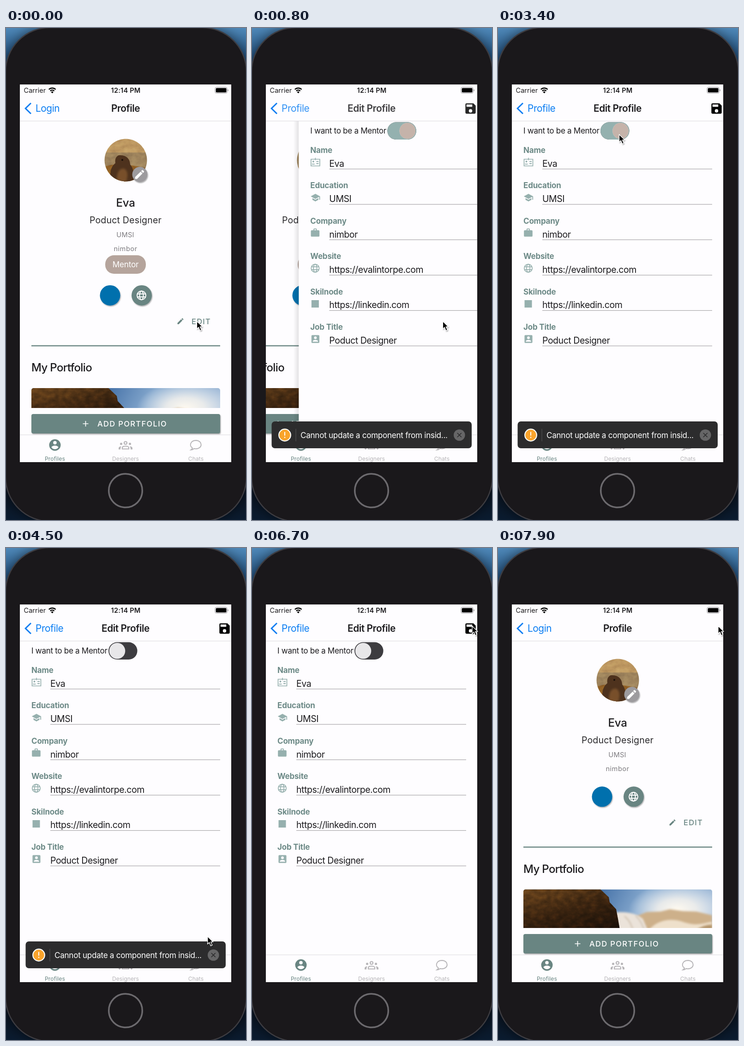
An HTML page for the animation above (8 s loop, 520 by 1063 pixels).

```html
<!DOCTYPE html>
<html lang="en">
<head>
<meta charset="utf-8">
<title>Edit profile</title>
<style>
html, body { margin: 0; width: 100%; height: 100%; overflow: hidden; background: #0b1626; }
svg { display: block; width: 100vw; height: 100vh; font-family: Inter, sans-serif; }
</style>
</head>
<body>
<svg id="stage" viewBox="0 0 520 1063" xmlns="http://www.w3.org/2000/svg"></svg>
<script>
const TEAL = '#698582', PALE = '#96b0ae', BLUE = '#0a7df2', INK = '#1c1b1e', PAPER = '#fefdff', GREY = '#b7b5b8';
const LOOP = 8000, STEP = 100, WIDTH = 458, LIFT = 40.4;

const ICON = {
  pencil: 'M20.7 7C21.1 6.6 21.1 6 20.7 5.6L18.4 3.3C18 2.9 17.3 2.9 17 3.3L15.1 5.1L18.9 8.9M3 17.2V21H6.8L17.8 9.9L14.1 6.2Z',
  person: 'M12 19.2C9.5 19.2 7.3 17.9 6 16C6 14 10 12.9 12 12.9S18 14 18 16C16.7 17.9 14.5 19.2 12 19.2M12 5A3 3 0 0 1 12 11A3 3 0 0 1 12 5M12 2A10 10 0 0 0 12 22A10 10 0 0 0 12 2Z',
  save: 'M15 9H5V5H15M12 19A3 3 0 0 1 12 13A3 3 0 0 1 12 19M17 3H5A2 2 0 0 0 3 5V19A2 2 0 0 0 5 21H19A2 2 0 0 0 21 19V7Z',
  school: 'M12 3L1 9L12 15L21 10.1V17H23V9M5 13.2V17.2L12 21L19 17.2V13.2L12 17Z',
  bag: 'M10 2H14A2 2 0 0 1 16 4V6H20A2 2 0 0 1 22 8V19A2 2 0 0 1 20 21H4A2 2 0 0 1 2 19V8A2 2 0 0 1 4 6H8V4A2 2 0 0 1 10 2M14 6V4H10V6Z',
  box: 'M6 17C6 15 10 13.9 12 13.9S18 15 18 17V18H6M12 6A3 3 0 0 1 12 12A3 3 0 0 1 12 6M3 5V19A2 2 0 0 0 5 21H19A2 2 0 0 0 21 19V5A2 2 0 0 0 19 3H5A2 2 0 0 0 3 5Z',
  square: 'M4 4H20V20H4Z'
};

const icon = (name, x, y, k, fill) =>
  `<path d="${ICON[name]}" fill="${fill}" fill-rule="evenodd" transform="translate(${x} ${y}) scale(${k}) translate(-12 -12)"/>`;
const text = (x, y, s, size, fill, ls = 0, weight = 400, anchor = 'start') =>
  `<text x="${x}" y="${y}" font-size="${size}" fill="${fill}" letter-spacing="${ls}" font-weight="${weight}" text-anchor="${anchor}">${s}</text>`;
const mid = (x, y, s, size, fill, ls, weight) => text(x, y, s, size, fill, ls, weight, 'middle');
const rect = (x, y, w, h, fill, rx = 0, more = '') =>
  `<rect x="${x}" y="${y}" width="${w}" height="${h}" fill="${fill}" rx="${rx}" ${more}/>`;
const disc = (x, y, r, fill, more = '') => `<circle cx="${x}" cy="${y}" r="${r}" fill="${fill}" ${more}/>`;
const shape = (d, fill, more = '') => `<path d="${d}" fill="${fill}" ${more}/>`;
const line = (d, stroke, w = 1, more = '') => `<path d="${d}" fill="none" stroke="${stroke}" stroke-width="${w}" ${more}/>`;
const group = (id, body, more = '') => `<g id="${id}" ${more}>${body}</g>`;
const SHADOW = 'filter="url(#drop)"', SOFT = 'filter="url(#soft)"', GRAIN = 'filter="url(#grain)"';

const globe = (x, y, r, c, w) => disc(x, y, r, 'none', `stroke="${c}" stroke-width="${w}"`) +
  `<ellipse cx="${x}" cy="${y}" rx="${r * .43}" ry="${r}" fill="none" stroke="${c}" stroke-width="${w}"/>` +
  line(`M${x - r * .93} ${y - r * .35}h${r * 1.86}m0 ${r * .7}h${-r * 1.86}`, c, w);

const photo = '<g clip-path="url(#photo)">' +
  rect(55, 778, 409, 110, 'url(#sky)') + rect(55, 778, 409, 110, 'url(#glow)') +
  shape('M300 836L322 827 352 826 372 821 400 825 430 826 464 834V888H290Z', '#cdb08a', SOFT) +
  shape('M315 888C330 845 370 838 400 848S440 852 464 848V888Z', '#eee0cb', SOFT) +
  shape('M410 888Q430 855 464 854V888Z', '#b3946c', SOFT) +
  shape('M246 829C275 824 300 829 314 842L334 888H262Z', '#ebe3da', SOFT) +
  line('M274 836c14 10 20 30 24 56m0-57c14 12 20 30 25 57', '#c9b9a5', 2, SOFT) +
  shape('M55 778H222L240 795 242 806 256 821 260 842 268 888H55Z', 'url(#rock)', GRAIN) + '</g>';

const avatar = '<g clip-path="url(#face)">' +
  `<g ${GRAIN}>` + rect(213, 239, 93, 93, '#9f8a6b') + rect(213, 239, 93, 30, '#bf9f70') +
  shape('M213 300Q240 288 306 303V332H213Z', '#93682f') + '</g>' +
  shape('M227 332C224 310 228 299 237 292C235 283 240 273 249 275C260 275 269 283 269 295C276 302 279 318 276 332Z', '#4e321d') +
  shape('M241 332C238 314 246 302 256 304C264 308 265 320 260 332Z', '#78502c', SOFT) +
  disc(252, 285, 2, '#1a100a') + '</g>' +
  disc(290, 316.5, 16.5, '#9d9b9e', SHADOW) + icon('pencil', 289.5, 316.5, 1.08, '#fff');

const profile = rect(30, 201, WIDTH, 678, PAPER) + avatar +
  mid(259, 386, 'Eva', 24, INK, -.2, 500) +
  mid(259, 422, 'Poduct Designer', 19.5, '#2a292c', .2) +
  mid(258.5, 452, 'UMSI', 14.6, '#7c7a7e', .3) +
  mid(259, 481.5, 'nimbor', 14.6, '#7c7a7e', .5) +
  group('pill', rect(215, 491, 88, 40, '#b5a49c', 19) + mid(259, 517, 'Mentor', 17.1, '#fff', -.2)) +
  '<g clip-path="url(#list)">' + group('lower',
    disc(225.5, 577.7, 22, '#0670ad', SHADOW) +
    disc(294, 577.7, 22, TEAL, SHADOW) + globe(293.5, 577.7, 9.5, '#fff', 2) +
    icon('pencil', 378, 633.5, .72, TEAL) + text(402, 639.5, 'EDIT', 16.5, TEAL, 1.2, 500) +
    rect(55, 685.4, 409, 2.4, TEAL) +
    text(55, 742, 'My Portfolio', 24, INK, -.65, 500) + photo) + '</g>' +
  rect(55, 834, 409, 42, TEAL, 4, SHADOW) +
  line('M166.500 855h12m-6-6v12', '#fff', 1.7) + text(198, 861, 'ADD PORTFOLIO', 16.5, '#fff', 1.35, 500);

const idCard = line('M56.500 283.500h19v14.500h-19zM66 280.500v5', PALE, 1.7) +
  disc(61.5, 288.5, 1.9, PALE) + line('M58.500 294.200h6m3.500-5.700h5m-5 4.500h5', PALE, 1.8);
const fields = [
  ['Name', 'Eva', idCard],
  ['Education', 'UMSI', icon('school', 66, 366.5, .92, PALE)],
  ['Company', 'nimbor', icon('bag', 65.5, 442.5, .93, PALE)],
  ['Website', 'https://evalintorpe.com', globe(65.5, 519, 8.7, PALE, 1.7)],
  ['Skilnode', 'https://linkedin.com', icon('square', 65.5, 596, 1, PALE)],
  ['Job Title', 'Poduct Designer', icon('box', 66, 672, .95, PALE)]
].map(([label, value, mark], i) => {
  const y = i * 76.45;
  return text(55, 270 + y, label, 17, '#6d8a87', -.2, 700) + mark +
    text(96, 299.6 + y, value, 19.5, INK, -.46) + rect(96, 304 + y, 368, 1.2, '#a9a7aa');
}).join('');

const edit = group('shade', rect(18, 201, 12, 678, 'url(#edge)')) + rect(30, 201, WIDTH, 678, PAPER) +
  text(55, 228, 'I want to be a Mentor', 17.1, INK, -.32) +
  rect(222, 203.5, 62.5, 37.5, '#3d3c40', 18.75) +
  group('on', rect(222, 203.5, 62.5, 37.5, '#94b1af', 18.75)) +
  group('thumb', disc(265.5, 222.3, 17.3, '#e8e7e9') + group('tint', disc(265.5, 222.3, 17.3, '#c5b3aa'))) + fields;

const header = rect(30, 122, WIDTH, 79, PAPER) + rect(30, 200.5, WIDTH, 1, '#dbdadd') +
  text(38.5, 140.3, 'Carrier', 14.6, INK) +
  mid(259.5, 140.3, '12:14 PM', 14.6, INK, .2, 600) +
  line('M92.800 132.800a10.500 10.500 0 0 1 14.800 0M95.700 136a6.300 6.300 0 0 1 9 0', '#000', 2.3) +
  shape('M97.500 138.300a3.900 3.900 0 0 1 5.400 0L100.200 141.200Z', '#000') +
  rect(452.8, 128, 26.5, 13, 'none', 3.5, 'stroke="#98969a"') + rect(454.6, 129.8, 23, 9.4, '#000', 2) +
  rect(480.5, 132.5, 1.3, 4, '#98969a', .6) +
  line('M54 162.300L42.200 173.800L54 185.300', BLUE, 3) +
  group('headA', text(64, 181, 'Login', 20.8, BLUE, -.45) + mid(259, 181, 'Profile', 20.8, INK, -.45, 600)) +
  group('headB', text(64, 181, 'Profile', 20.8, BLUE, -.4) + mid(259, 181, 'Edit Profile', 20.8, INK, -.42, 600) +
    icon('save', 473.5, 174, 1.24, '#000'));

const people = disc(259, 896.5, 3, 'none', `stroke="${GREY}" stroke-width="2.2"`) +
  disc(249.5, 898.5, 2.5, GREY) + disc(268.5, 898.5, 2.5, GREY) +
  line('M252 909.500v-2.500q0-3.500 7-3.500t7 3.500v2.500z', GREY, 2.2) +
  shape('M244 910.500v-2.500q0-4 6-4.300q-2 2-2 6.800zM274 910.500v-2.500q0-4-6-4.300q2 2 2 6.800z', GREY);
const tabs = rect(30, 879, WIDTH, 60, PAPER) + rect(30, 878.5, WIDTH, 1, '#dbdadd') +
  icon('person', 106, 901, 1.25, TEAL) + people +
  line('M404 907.500C396.500 903 399 891.500 411.500 891C426.500 891.500 426.500 909 411.500 909.200Q409 909.200 407.500 908.800Q404.500 911.500 400.500 911.500Q403.500 909.500 404 907.500Z', GREY, 2) +
  mid(106, 935.3, 'Profiles', 12.2, TEAL, .1) + mid(259, 935.3, 'Designers', 12.2, GREY) + mid(411.5, 935.3, 'Chats', 12.2, GREY);

const toast = rect(42.5, 850, 433.5, 58, '#2c2c2d', 7) +
  disc(71, 879.5, 12.8, '#f9a42c', 'stroke="#fff" stroke-width="2.2"') +
  rect(70, 872.5, 2, 8.5, '#fff', 1) + disc(71, 884.5, 1.3, '#fff') + rect(94.5, 866, 1, 27, '#565657') +
  text(105, 885.5, 'Cannot update a component from insid...', 17.1, '#fff', -.28) +
  disc(449.3, 879.5, 12.3, '#666667') + line('M444.800 875l9 9m0-9l-9 9', '#2c2c2d', 1.7);

const stage = document.getElementById('stage');
stage.innerHTML = `<defs>
  <clipPath id="screen">${rect(30, 122, WIDTH, 816, '#fff')}</clipPath>
  <clipPath id="list">${rect(30, 201, WIDTH, 620, '#fff')}</clipPath>
  <clipPath id="photo">${rect(55, 778, 409, 120, '#fff', 5)}</clipPath>
  <clipPath id="face">${disc(259.5, 285.5, 46, '#fff')}</clipPath>
  <filter id="drop" x="-20%" y="-20%" width="150%" height="150%"><feDropShadow dx="1.2" dy="1.8" stdDeviation="1.3" flood-opacity=".35"/></filter>
  <filter id="soft"><feGaussianBlur stdDeviation="2"/></filter>
  <filter id="halo"><feGaussianBlur stdDeviation="14"/></filter>
  <filter id="grain" x="0" y="0" width="100%" height="100%" color-interpolation-filters="sRGB">
    <feTurbulence type="fractalNoise" baseFrequency=".07 .1" numOctaves="4" seed="4"/>
    <feColorMatrix values="1.1 0 0 0 -.05  .85 0 0 0 -.05  .5 0 0 0 -.04  0 0 0 0 .4"/>
    <feComposite operator="in" in2="SourceGraphic" result="n"/>
    <feBlend mode="soft-light" in="n" in2="SourceGraphic"/>
  </filter>
  <linearGradient id="back" x2="0" y2="1"><stop stop-color="#4f88b8"/><stop offset=".07" stop-color="#1c4a78"/><stop offset=".25" stop-color="#15151a"/><stop offset=".9" stop-color="#0a101a"/><stop offset="1" stop-color="#0b1c30"/></linearGradient>
  <linearGradient id="edge"><stop stop-color="#000" stop-opacity="0"/><stop offset="1" stop-color="#000" stop-opacity=".13"/></linearGradient>
  <linearGradient id="rock" x2=".5" y2="1"><stop stop-color="#6b4a24"/><stop offset=".5" stop-color="#3a2714"/><stop offset="1" stop-color="#1c130b"/></linearGradient>
  <linearGradient id="sky" x2="1" y2=".15"><stop offset=".4" stop-color="#4672a8"/><stop offset=".65" stop-color="#86a9ce"/><stop offset="1" stop-color="#a3bcd8"/></linearGradient>
  <radialGradient id="glow" gradientUnits="userSpaceOnUse" cx="388" cy="822" r="105" gradientTransform="translate(0 370) scale(1 .55)"><stop stop-color="#fffaf0"/><stop offset=".4" stop-color="#fdf8f0" stop-opacity=".8"/><stop offset="1" stop-color="#fff" stop-opacity="0"/></radialGradient>
</defs>` +
  rect(0, 0, 520, 1063, 'url(#back)') +
  rect(-1, -1, 522, 1067, '#000', 96, 'opacity=".6" filter="url(#halo)"') +
  rect(-1, -1, 522, 1067, '#1a181b', 96, 'stroke="#3d3c41" stroke-width="2.5"') +
  disc(259, 999.5, 36.3, 'none', 'stroke="#6c6a6e" stroke-width="3.5"') +
  `<g clip-path="url(#screen)">${group('profile', profile)}${group('edit', edit)}${header}${tabs}${group('toast', toast)}</g>` +
  group('cursor', shape('M0 0V16.500L3.800 13 6.800 20.300 10 19 7 11.900H12Z', '#000', 'stroke="#fff" stroke-width="1.3" stroke-linejoin="round"'), SHADOW);

const el = id => document.getElementById(id);
const clamp = v => Math.max(0, Math.min(1, v));
const ease = v => (v = clamp(v), v * v * (3 - 2 * v));
const move = (id, x, y = 0) => el(id).setAttribute('transform', `translate(${x} ${y})`);
const fade = (id, o) => el(id).setAttribute('opacity', o);

// Critically damped spring, what is left of the way after ms
function spring(ms) {
  const u = Math.max(0, ms) * .01826, left = (1 + u) * Math.exp(-u);
  return left < .002 ? 0 : left;
}

// time, x, y of the pointer tip
const path = [[0, 413.5, 633.5], [2500, 413, 634], [3300, 262.5, 230], [3900, 262.5, 230], [4600, 447, 875],
  [4900, 447, 875], [5600, 417.5, 168], [5800, 418, 168], [6300, 477, 168.5], [LOOP, 477, 168.5]];

function pointer(t) {
  const i = path.findIndex(p => p[0] > t), a = path[i - 1], b = path[i];
  const k = ease((t - a[0]) / (b[0] - a[0]));
  return [a[1] + (b[1] - a[1]) * k, a[2] + (b[2] - a[2]) * k];
}

function draw(t) {
  const open = t < 6750 ? 1 - spring(t - 618) : spring(t - 6750);
  const saved = t >= 6700, on = 1 - ease((t - 3700) / 300);
  move('profile', -.3 * WIDTH * open);
  move('edit', WIDTH * (1 - open));
  fade('edit', open > 0 ? 1 : 0);
  fade('shade', open);
  fade('headA', clamp(1 - 2 * open));
  fade('headB', open);
  fade('pill', saved ? 0 : 1);
  move('lower', 0, saved ? -LIFT : 0);
  fade('on', on);
  fade('tint', on);
  move('thumb', -24.5 * (1 - on));
  fade('toast', t >= 700 && t < 4800 ? 1 : 0);
  move('cursor', ...pointer(t));
}

function tick(now) {
  draw(Math.floor(now % LOOP / STEP) * STEP);
  requestAnimationFrame(tick);
}
draw(0);
requestAnimationFrame(tick);
</script>
</body>
</html>
```
